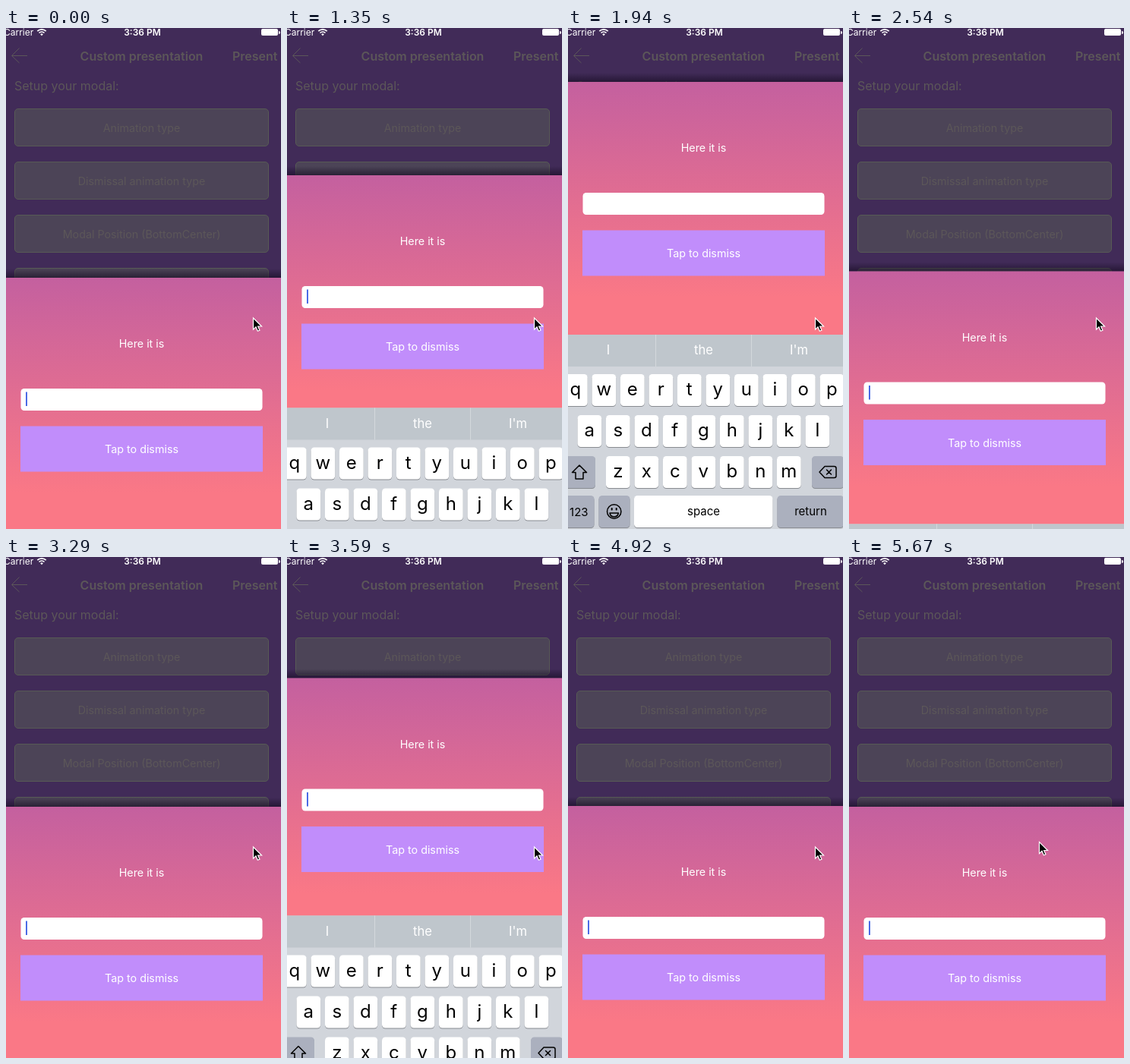
Animation, 362 px wide and 660 px high, one loop 5770 ms. Source, as an HTML page:

```html
<!DOCTYPE html>
<html lang="en">
<head>
<meta charset="utf-8">
<title>Modal with keyboard</title>
<style>
  html, body { margin: 0; width: 100%; height: 100%; overflow: hidden; background: #412b58; }
  svg { display: block; font-family: Inter, Roboto, sans-serif; font-size: 14.3px; }
  .mid { text-anchor: middle; }
  .bold { font-weight: 600; }
  .dim { fill: #5c5759; }
  .light { fill: #fff; }
  .icon { fill: none; stroke: #000; stroke-width: 1.5; stroke-linejoin: round; stroke-linecap: round; }
</style>
</head>
<body>
<svg width="362" height="660" viewBox="0 0 362 660">
  <defs>
    <linearGradient id="pink" x2="0" y2="1">
      <stop stop-color="#c4609f"/>
      <stop offset=".85" stop-color="#fa7886"/>
    </linearGradient>
    <linearGradient id="shade" x2="0" y2="1">
      <stop stop-color="#140a20" stop-opacity="0"/>
      <stop offset="1" stop-color="#140a20" stop-opacity=".6"/>
    </linearGradient>
  </defs>

  <rect width="362" height="660" fill="#412b58"/>
  <g class="light" font-size="12">
    <text x="-3" y="10">Carrier</text>
    <text class="mid bold" x="179.5" y="10">3:36 PM</text>
    <g fill="none" stroke="#fff" stroke-width="1.7">
      <path d="M41.3 4.2a8.2 8.2 0 0 1 11.4 0M43.5 6.5a5 5 0 0 1 7 0"/>
    </g>
    <path d="M45.2 8.2a2.6 2.6 0 0 1 3.6 0L47 10.2z"/>
    <rect x="336" y="1" width="22" height="9" rx="2"/>
    <path d="M359 4a1.5 1.5 0 0 1 0 4z"/>
  </g>
  <path d="M28 36.5H8M17.5 26.5L7.5 36.5l10 9.5" fill="none" stroke="#5c5759"/>
  <g class="dim" font-size="16">
    <text class="mid bold" x="178.5" y="43">Custom presentation</text>
    <text class="bold" x="357.5" y="43" text-anchor="end">Present</text>
    <text x="11" y="81.5">Setup your modal:</text>
  </g>
  <g id="options"></g>

  <g id="modal">
    <rect y="-12" width="362" height="12" fill="url(#shade)"/>
    <rect width="362" height="333.5" fill="url(#pink)"/>
    <text class="mid light" x="178.5" y="92">Here it is</text>
    <rect x="19.5" y="146" width="318" height="29" rx="4.5" fill="#fff"/>
    <rect id="caret" x="26" y="150.5" width="2" height="18.5" fill="#4b6be6"/>
    <rect x="19" y="195.5" width="319" height="60" fill="#c18dfb"/>
    <text class="mid light" x="178.5" y="231">Tap to dismiss</text>
  </g>

  <g id="keyboard"></g>

  <path id="pointer" d="M0 0V15.2l3.5-3.3 2.3 5.4 2.6-1.1-2.3-5.2H11z" stroke="#fff" stroke-width="1.2"/>
</svg>

<script>
const byId = id => document.getElementById(id);
const modal = byId('modal'), keyboard = byId('keyboard');
const caret = byId('caret'), pointer = byId('pointer');

const label = (text, x, y, size, fill = '#000') =>
  `<text class="mid" x="${x}" y="${y}" font-size="${size}" fill="${fill}">${text}</text>`;

const optionNames = ['Animation type', 'Dismissal animation type', 'Modal Position (BottomCenter)', ''];
byId('options').innerHTML = optionNames.map((name, i) => {
  const y = 106 + 70 * i;
  return `<rect x="11.5" y="${y + .5}" width="334" height="49" rx="4.5" fill="#4c4457" stroke="#575a55"/>` +
    label(name, 178.5, y + 30.5, 14.3, '#5c5759');
}).join('');

function key(x, y, width, fill = '#fff') {
  const box = (top, color) =>
    `<rect x="${x}" y="${top}" width="${width}" height="42" rx="4.5" fill="${color}"/>`;
  return box(y + 1, '#888b91') + box(y, fill);
}

const letterRow = (letters, x, y) => [...letters].map((letter, i) => {
  const left = x + 37.5 * i;
  return key(left, y, 31.7) + label(letter, left + 15.8, y + 28, 24);
}).join('');

const GRAY = '#abb0be';
keyboard.innerHTML =
  '<rect width="362" height="258" fill="#d1d5db"/>' +
  '<rect width="362" height="42" fill="#bfc6cc"/>' +
  '<path d="M115.5 0v42M241.5 0v42" stroke="#d3d8dc"/>' +
  ['I', 'the', "I'm"].map((word, i) => label(word, 53 + 125.5 * i, 26, 16.6, '#fff')).join('') +
  letterRow('qwertyuiop', -6, 52) +
  letterRow('asdfghjkl', 12.5, 106) +
  letterRow('zxcvbnm', 50, 160) +
  key(-6, 160, 42, GRAY) + key(321, 160, 42, GRAY) +
  key(-6, 212, 40.5, GRAY) + key(40.5, 212, 41, GRAY) +
  key(87, 212, 182.5) + key(275.5, 212, 87.5, GRAY) +
  label('123', 14.3, 238.5, 15) +
  label('space', 178.5, 238, 15) +
  label('return', 319.5, 238, 15) +
  `<g class="icon">
    <path d="M15 172l9.5 9.5h-4.5v8.5h-10v-8.5h-4.500z"/>
    <path d="M338 173.500h12.500q2.500 0 2.500 2.500v10q0 2.500-2.500 2.500H338l-7-7.500zM340.500 178l6 6m0-6l-6 6"/>
    <circle cx="60.700" cy="233" r="9.200"/>
    <path d="M55 235h11.400q-1 5-5.700 5t-5.700-5z"/>
    <path d="M57.700 229v1.500m6-1.500v1.500" stroke-width="2"/>
  </g>`;

const LOOP = 5770;
// The picture changes only at these times.
const ticks = [0, 1350, 1490, 1640, 1790, 1940, 2240, 2390, 2540, 2690, 2840, 2990, 3290,
  3590, 3740, 3890, 4040, 4180, 4470, 4620, 4770, 4920, 5070, 5220, 5520, 5670];
// Alternating starts of raising and lowering.
const toggles = [1254, 2251, 3467, 4480];
const caretGaps = [[1940, 2240], [2990, 3290], [4180, 4470], [5220, 5520]];
const TRAVEL = 258, STIFFNESS = .01826, KEYBOARD_LEAD = 20;

// Critically damped spring from 0 to 1.
const spring = ms => 1 - (1 + STIFFNESS * ms) * Math.exp(-STIFFNESS * ms);

function lift(time, lead) {
  const i = toggles.findLastIndex(start => start <= time);
  if (i < 0) return 0;
  const raising = i % 2 === 0;
  const progress = spring(time - toggles[i] + (raising ? lead : 0));
  return Math.round(2 * TRAVEL * (raising ? progress : 1 - progress)) / 2;
}

function caretOpacity(time) {
  for (const [from, to] of caretGaps) {
    if (time >= from && time < to) return 0;
    if (time >= from - 150 && time < from) return .45;
  }
  return 1;
}

const move = (node, x, y) => node.setAttribute('transform', `translate(${x} ${y})`);

function draw(now) {
  const elapsed = now % LOOP;
  const time = ticks.findLast(tick => tick <= elapsed);
  move(modal, 0, 329 - lift(time, 0));
  move(keyboard, 0, 662 - lift(time, KEYBOARD_LEAD));
  caret.setAttribute('opacity', caretOpacity(time));
  if (time < 5670) move(pointer, 325.5, 382);
  else move(pointer, 250.5, 375.5);
}

const started = performance.now();
function loop() {
  draw(performance.now() - started);
  requestAnimationFrame(loop);
}
loop();
</script>
</body>
</html>
```
